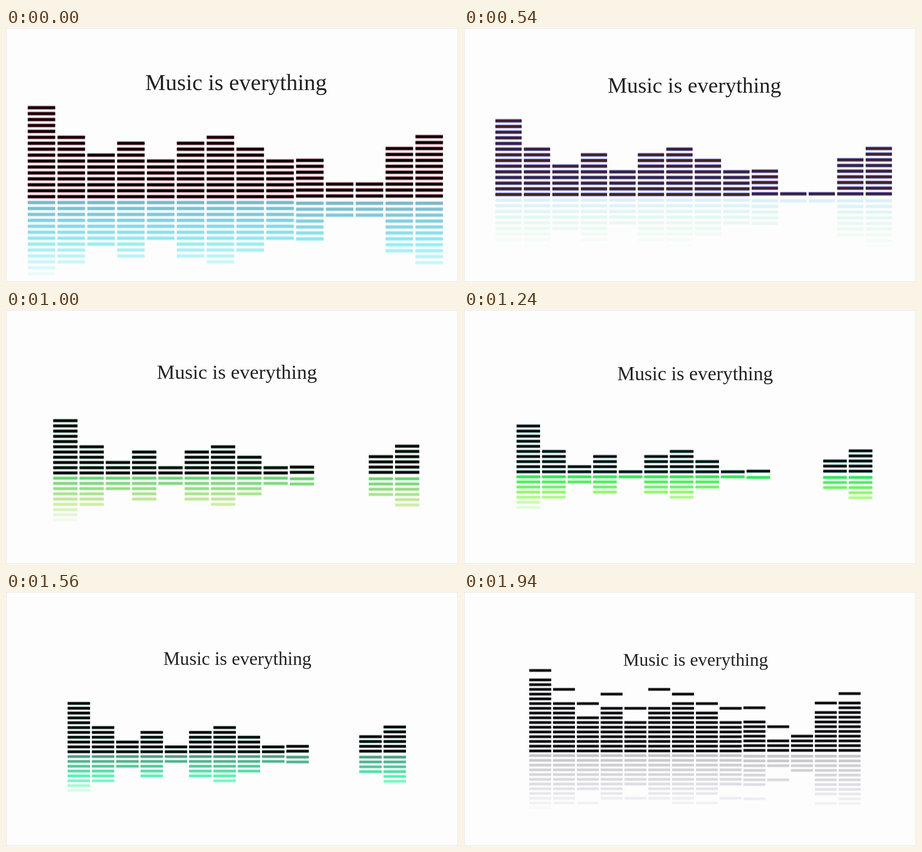
An HTML page with a canvas for the animation above (2040 ms loop, 998 px wide and 561 px high).

```html
<!DOCTYPE html>
<html lang="en">
<head>
<meta charset="utf-8">
<title>Music is everything</title>
<style>
html, body { margin: 0; width: 100%; height: 100%; overflow: hidden; background: #fdfdfd; }
canvas { display: block; }
</style>
</head>
<body>
<canvas id="stage" width="998" height="561"></canvas>
<script>
const ctx = document.getElementById('stage').getContext('2d');
const LOOP = 2040, LAST = 41, PAPER = [253, 253, 253];

// Resting level and floating cap of each column, counted in rows
const levels = [16, 11, 8, 10, 7, 10, 11, 9, 7, 7, 3, 3, 9, 11];
const caps = [18, 14, 11, 13, 10, 14, 13, 11, 10, 10, 6, 4, 11, 13];
const CAPS_FROM = 38;

// [step, value]
const zoomKeys = [[0, 1], [5, .99], [11, .955], [17, .914], [26, .857], [34, .815], [41, .798]];
const shiftKeys = [[0, 0], [5, -1], [11, -2], [17, -3], [26, -6], [34, -5], [39, 2], [41, 0]];

// [step, bar core, bar edge, reflection near, reflection middle, reflection length in rows]
const tints = [
  [0, '040204', '782a3c', '78b8cc', '90ecf4', 13],
  [5, '18160f', '523878', 'cdd0ec', 'dcf8ec', 12],
  [11, '40222a', '4040a8', 'dcf0f8', 'e8faf0', 9],
  [17, '000000', '1c3010', 'b2ba90', 'f4d8c8', 11],
  [26, '0c0814', '1a5040', '30e858', 'a0fc70', 7],
  [34, '000000', '0c3028', '4a9e82', '50f4b0', 8],
  [41, '08080c', '34343a', 'c4c4c8', 'dcdce4', 12]
].map(([step, ...v]) => [step, ...v.slice(0, 4).map(rgb), v[4]]);

function rgb(hex) {
  return [0, 2, 4].map(i => parseInt(hex.substr(i, 2), 16));
}

const lerp = (a, b, p) => a + (b - a) * p;
const mix = (a, b, p) => a.map((v, i) => lerp(v, b[i], p));
const css = c => `rgb(${c.map(Math.round)})`;

// Index of the key before the step, and progress to the next one
function locate(keys, step) {
  let i = 0;
  while (i < keys.length - 2 && keys[i + 1][0] <= step) i++;
  return [i, (step - keys[i][0]) / (keys[i + 1][0] - keys[i][0])];
}

function linear(keys, step) {
  const [i, p] = locate(keys, step);
  return lerp(keys[i][1], keys[i + 1][1], p);
}

// Cubic through the keys, flat at both ends
function smooth(keys, step) {
  const [i, p] = locate(keys, step);
  const [x0, y0] = keys[i], [x1, y1] = keys[i + 1];
  const slope = k => {
    const a = keys[k - 1], b = keys[k + 1];
    return a && b ? (b[1] - a[1]) / (b[0] - a[0]) * (x1 - x0) : 0;
  };
  const q = 1 - p;
  return q * q * ((1 + 2 * p) * y0 + p * slope(i)) + p * p * ((1 + 2 * q) * y1 - q * slope(i + 1));
}

// Steps last 20, 100 and 20 ms in turn; the last one is held
function stepAt(ms) {
  const r = ms % 140;
  return Math.min(LAST, 3 * Math.floor(ms / 140) + (r < 20 ? 0 : r < 120 ? 1 : 2));
}

function bar(x, y, height, color) {
  ctx.fillStyle = css(color);
  ctx.fillRect(x, y - height / 2, 60.5, height);
}

// A bar with a pale soft rim that tints the gaps
function softBar(x, y, core, edge) {
  bar(x, y, 10.5, mix(PAPER, edge, .25));
  bar(x, y, 7.2, edge);
  bar(x, y, 5, core);
}

function draw(step) {
  const zoom = smooth(zoomKeys, step);
  const shift = Math.round(linear(shiftKeys, step));
  const [k, p] = locate(tints, step);
  const [core, edge, near, middle] = [1, 2, 3, 4].map(j => mix(tints[k][j], tints[k + 1][j], p));
  const half = lerp(tints[k][5], tints[k + 1][5], p) / 2;

  ctx.setTransform(1, 0, 0, 1, 0, 0);
  ctx.fillStyle = css(PAPER);
  ctx.fillRect(0, 0, 998, 561);
  ctx.strokeStyle = '#e2e2e4';
  ctx.strokeRect(.5, .5, 997, 560);

  // The camera pulls back around a fixed point
  ctx.translate(524, 266);
  ctx.scale(zoom, zoom);
  ctx.translate(-524, -266);

  ctx.fillStyle = '#222';
  ctx.font = '50.5px "Liberation Serif", "Times New Roman", serif';
  ctx.textAlign = 'center';
  ctx.fillText('Music is everything', 508, 137);

  const pitch = 13.1, base = 372.5;
  levels.forEach((level, c) => {
    const x = 48 + c * 65.85, lift = c > 8 ? 1.5 : 0;
    const row = i => {
      softBar(x, base - lift - i * pitch, core, edge);
      if (i >= half * 2) return;
      const color = i < half ? mix(near, middle, i / half) : mix(middle, PAPER, i / half - 1);
      softBar(x, base + lift + (i + 1) * pitch, color, mix(PAPER, color, .75));
    };
    const top = Math.min(level + shift, caps[c]);
    for (let i = 0; i < top; i++) row(i);
    if (step >= CAPS_FROM && top < caps[c]) row(caps[c] - 1);
  });
}

const start = performance.now();
function tick() {
  draw(stepAt((performance.now() - start) % LOOP));
  requestAnimationFrame(tick);
}
tick();
</script>
</body>
</html>
```
